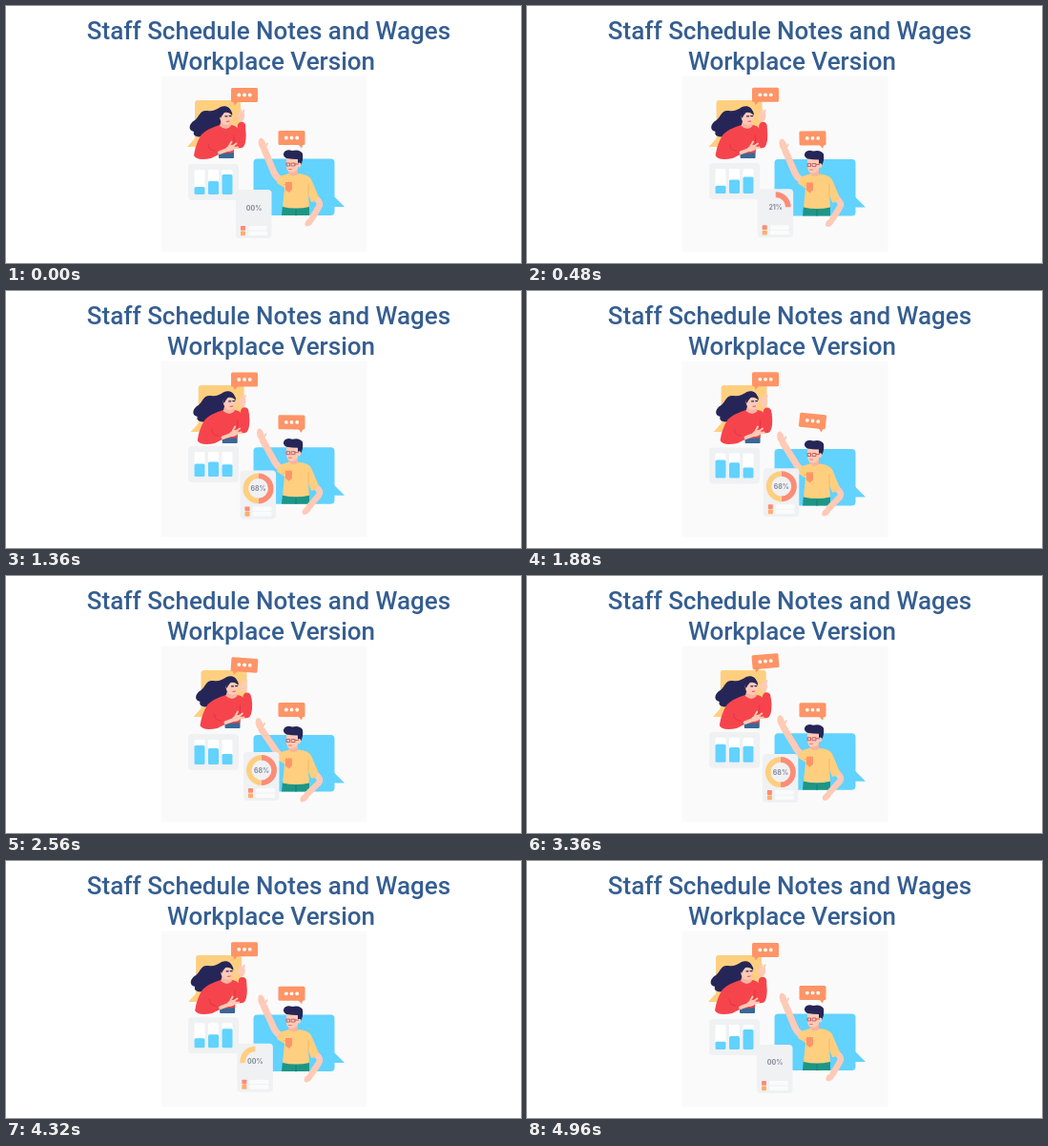
These frames come from a looping animation (540 by 270 pixels, 5 s). An HTML page with a canvas:

```html
<!DOCTYPE html>
<html lang="en">
<head>
<meta charset="utf-8">
<title>Staff Schedule Notes and Wages</title>
<style>
  html, body { margin: 0; width: 100%; height: 100%; overflow: hidden; background: #fff; }
  canvas { display: block; width: 540px; height: 270px; }
</style>
</head>
<body>
<canvas id="stage"></canvas>
<script>
const LOOP = 5000, STEP = 40;
const NAVY = '#252657', SKIN = '#ffcab6', BLUE = '#62d2ff', AMBER = '#ffcf80',
      ORANGE = '#ff9466', RED = '#f6444d', CORAL = '#fc8c76', CARD = '#eff1f3';

const canvas = document.getElementById('stage');
const dpr = window.devicePixelRatio || 1;
canvas.width = 540 * dpr;
canvas.height = 270 * dpr;
const ctx = canvas.getContext('2d');
ctx.lineCap = ctx.lineJoin = 'round';

// Helpers
const clamp = v => Math.max(0, Math.min(1, v));
const ramp = (t, from, to) => clamp((t - from) / (to - from));
const wave = (t, cycles) => (1 - Math.cos(2 * Math.PI * cycles * t / LOOP)) / 2;

function keyed(t, ...keys) {
  for (let i = 1; i < keys.length; i++) {
    const [t0, a] = keys[i - 1], [t1, b] = keys[i];
    if (t <= t1) return a + (b - a) * (t - t0) / (t1 - t0);
  }
  return keys[keys.length - 1][1];
}

function at(x, y, draw, degrees = 0) {
  ctx.save();
  ctx.translate(x, y);
  ctx.rotate(degrees * Math.PI / 180);
  draw();
  ctx.restore();
}

function box(x, y, w, h, r, color) {
  ctx.fillStyle = color;
  ctx.beginPath();
  ctx.roundRect(x, y, w, h, r);
  ctx.fill();
}

function shape(d, color) {
  ctx.fillStyle = color;
  ctx.fill(new Path2D(d));
}

function line(d, color, width) {
  ctx.strokeStyle = color;
  ctx.lineWidth = width;
  ctx.stroke(new Path2D(d));
}

function oval(x, y, rx, ry, color, angle = 0) {
  ctx.fillStyle = color;
  ctx.beginPath();
  ctx.ellipse(x, y, rx, ry, angle, 0, 2 * Math.PI);
  ctx.fill();
}

function label(text, x, y, font, color) {
  ctx.font = font;
  ctx.fillStyle = color;
  ctx.textAlign = 'center';
  ctx.fillText(text, x, y);
}

// Orange chat bubble centred on (x, y); side is -1 for a left tail, 1 for a right tail
function chat(x, y, degrees, side) {
  at(x, y, () => {
    box(-14, -7.5, 28, 15, 1.5, ORANGE);
    shape(`M${side * 12} 6L${side * 10.5} 11L${side * 6} 6Z`, ORANGE);
    for (const dx of [-5.7, 0, 5.7]) oval(dx, 0, 1.9, 1.9, '#fff');
  }, degrees);
}

function woman(s) {
  const shift = 6.5 * s;
  at(shift, 0, () => {
    box(198, 99, 48, 51, 3, AMBER);
    shape('M199 138L190 148H201Z', AMBER);
    shape('M236 112C236 106 230 104 225 106C220 109 217 111 211 110C203 109 203 116 198 120' +
          'C191 124 191 131 197 132C195 137 203 139 207 136C214 140 224 136 227 129L234 118Z', NAVY);
    box(223, 148, 16, 12, 1, '#3a6895');
    // Sweater with the far sleeve hanging to a bent elbow
    shape('M224 125Q230 128 236 125Q241 125 245 131L251 128Q253 142 249 148Q245 151 239 147' +
          'L239 154L225 155L215 160Q200 163 197 157Q199 144 205 135Q211 129 224 125Z', RED);
    line('M212 145Q212 152 219 152M239 136V146', '#dc3546', 0.9);
    shape('M226 119H234L236 126Q231 132 224 126Z', '#f9b49f');
    shape('M224 113Q229 109 235 111L236.5 119Q236 125 231 125Q225 124 224 117Z', SKIN);
    shape('M225 118Q222 113 224 109Q230 105 235 109Q238 112 237 115Q234 111 229 112Q227 114 225 118Z', NAVY);
    line('M230 115.8H232M234.2 115.6H236', NAVY, 1.3);
    line('M231.5 121.4L234 121', RED, 1);
    line('M224 154L232 151', SKIN, 4);
    oval(235, 149.5, 4.4, 3.1, SKIN, -0.4);
    line('M234 147L236.5 142.5M237 147.5L241.5 144.5M238 149.5L243 148.5', SKIN, 1.8);
  });

  // The raised hand travels less than the body.
  const hand = 246.5 + 2.5 * s, wrist = 117 + 0.8 * s;
  oval(hand, wrist - 1, 3.6, 5.6, SKIN, 0.15);
  line(`M${hand - 1} ${wrist - 4}L${hand - 0.5} ${wrist - 8}M${hand + 1.5} ${wrist - 4}L${hand + 3} ${wrist - 7.5}` +
       `M${hand - 2} ${wrist}L${hand - 5} ${wrist - 2}`, SKIN, 2);
  line(`M${246.5 + shift} 142L${hand + 0.5 + 0.5 * shift} ${wrist + 9}`, RED, 8.5);
}

function barCard(t) {
  const heights = [
    keyed(t, [0, 8], [880, 8.3], [1880, 19], [2560, 20], [3360, 19], [4320, 10], [LOOP, 8]),
    keyed(t, [0, 14], [880, 15], [2560, 17], [4320, 14], [LOOP, 14]),
    keyed(t, [0, 21], [880, 14.5], [1880, 11], [2560, 11], [3360, 17], [4320, 20], [LOOP, 21])
  ];
  at(191, 166 - 3 * wave(t, 2), () => {
    box(0, 0, 53, 38, 4, CARD);
    heights.forEach((h, i) => {
      const x = 6.5 + 14.5 * i;
      box(x, 6, 11, 26, 1.5, '#fff');
      box(x, 32 - h, 11, h, 1.5, BLUE);
    });
  });
}

function man(s) {
  const body = 6.5 * s;
  at(0, 6.5 * s, () => {
    box(259.5, 160.5, 85, 59.5, 4, BLUE);
    shape('M343 199L355 211H341Z', BLUE);
    shape('M290 209H318V220H289Z', '#1d9685');
    line('M304 214V220', '#12796f', 0.8);
  });

  const handX = 269 - 3 * s, handY = 145 + 10.5 * s;
  const elbowX = 281, elbowY = 175 + 5.5 * s;
  line(`M293 ${185 + body}Q${elbowX + 3} ${elbowY + 7} ${elbowX} ${elbowY}L${handX + 2} ${handY + 6}`, SKIN, 7);
  oval(handX - 0.5, handY, 3.6, 6.5, SKIN, -0.25);
  line(`M${handX + 3} ${handY + 3}L${handX + 5} ${handY - 0.5}`, SKIN, 2);

  const tipX = 318 - 5 * s, tipY = 227 + 6 * s;
  line(`M325 ${202 + body}Q331 ${207 + body} 328 ${211 + body}L${tipX + 3} ${tipY - 4}`, SKIN, 6.5);
  oval(tipX, tipY, 5.5, 3.3, SKIN, -0.75);

  at(0, body, () => {
    shape('M297 170H306V179Q301 183 296 178Z', '#f8b49d');
    shape('M290 178L297 176Q301 181 307 176Q317 177 320 182L328 201Q325 206 320 206L317 198' +
          'L318 211Q304 214 290 211L292 191L284 186L287 179Z', AMBER);
    line('M317 187V198M291 188Q295 188 297 185', '#eeb25f', 0.8);
    shape('M293 185H300V193L296.5 196L293 193Z', '#ff9567');
    shape('M294 159H307V168Q305 175 299.5 175Q294 175 294 167Z', SKIN);
    shape('M294 160Q289 157 292 153Q295 150 300 152Q308 150 311 155Q312 162 309 167' +
          'L306 166V161Q300 161 294 160Z', NAVY);
    oval(307.5, 167, 1.8, 2.4, SKIN);
    line('M294.5 165H297.5V168H294.5ZM299.5 165H303V168H299.5ZM303 166H306.5', '#b64b55', 0.8);
    line('M296.5 171.5H299.5', '#d66e66', 0.8);
  });
}

function arc(from, to, color) {
  if (to <= from) return;
  ctx.beginPath();
  ctx.arc(19, 19, 13.2, (from - 0.25) * 2 * Math.PI, (to - 0.25) * 2 * Math.PI);
  ctx.strokeStyle = color;
  ctx.lineWidth = 5.6;
  ctx.lineCap = 'butt';
  ctx.stroke();
  ctx.lineCap = 'round';
}

function ringCard(t, s) {
  const head = ramp(t, 230, 1230), tail = ramp(t, 3500, 4620);
  const percent = Math.round(68 * (ramp(t, 230, 1030) - ramp(t, 3500, 4250)));
  at(241 + 8 * s, 193 - 8 * s, () => {
    box(0, 0, 37.5, 51, 4, CARD);
    arc(tail, Math.min(head, 0.5), CORAL);
    arc(Math.max(tail, 0.5), head, AMBER);
    label(String(percent).padStart(2, '0') + '%', 19, 21.5,
      'bold 7px Inter, sans-serif', '#858b99');
    [CORAL, '#ffae6c'].forEach((color, i) => {
      const y = 38 + 5.4 * i;
      box(5, y, 5, 4.8, 0.7, color);
      box(13, y, 20, 4.6, 1.5, '#fbfbfc');
    });
  });
}

function render(now) {
  const t = Math.floor((now % LOOP) / STEP) * STEP;
  const s = wave(t, 1);
  ctx.setTransform(dpr, 0, 0, dpr, 0, 0);
  box(0, 0, 540, 270, 0, '#fff');
  box(162.5, 73.5, 216, 185, 0, '#fafafa');
  const titleFont = '500 26px Roboto, sans-serif';
  label('Staff Schedule Notes and Wages', 275.5, 35, titleFont, '#355e91');
  label('Workplace Version', 278, 67, titleFont, '#355e91');

  woman(s);
  chat(250,
    93.5 + keyed(t, [0, 0], [1880, -0.7], [2560, 0], [3360, -3.8], [3680, -6], [4320, -0.7], [LOOP, 0]),
    keyed(t, [0, 0], [1880, 0], [2560, 4], [3360, -5], [3800, -3], [4320, 0], [LOOP, 0]), -1);
  barCard(t);
  man(s);
  chat(299.5,
    138.5 + keyed(t, [0, 0], [880, 0.7], [1880, -2], [2560, 2], [3360, 2.2], [4320, 0.8], [LOOP, 0]),
    keyed(t, [0, 0], [400, 0], [880, -5], [1880, 6], [2560, 0], [LOOP, 0]), 1);
  ringCard(t, s);
}

function loop() {
  render(performance.now());
  requestAnimationFrame(loop);
}
loop();
</script>
</body>
</html>
```
